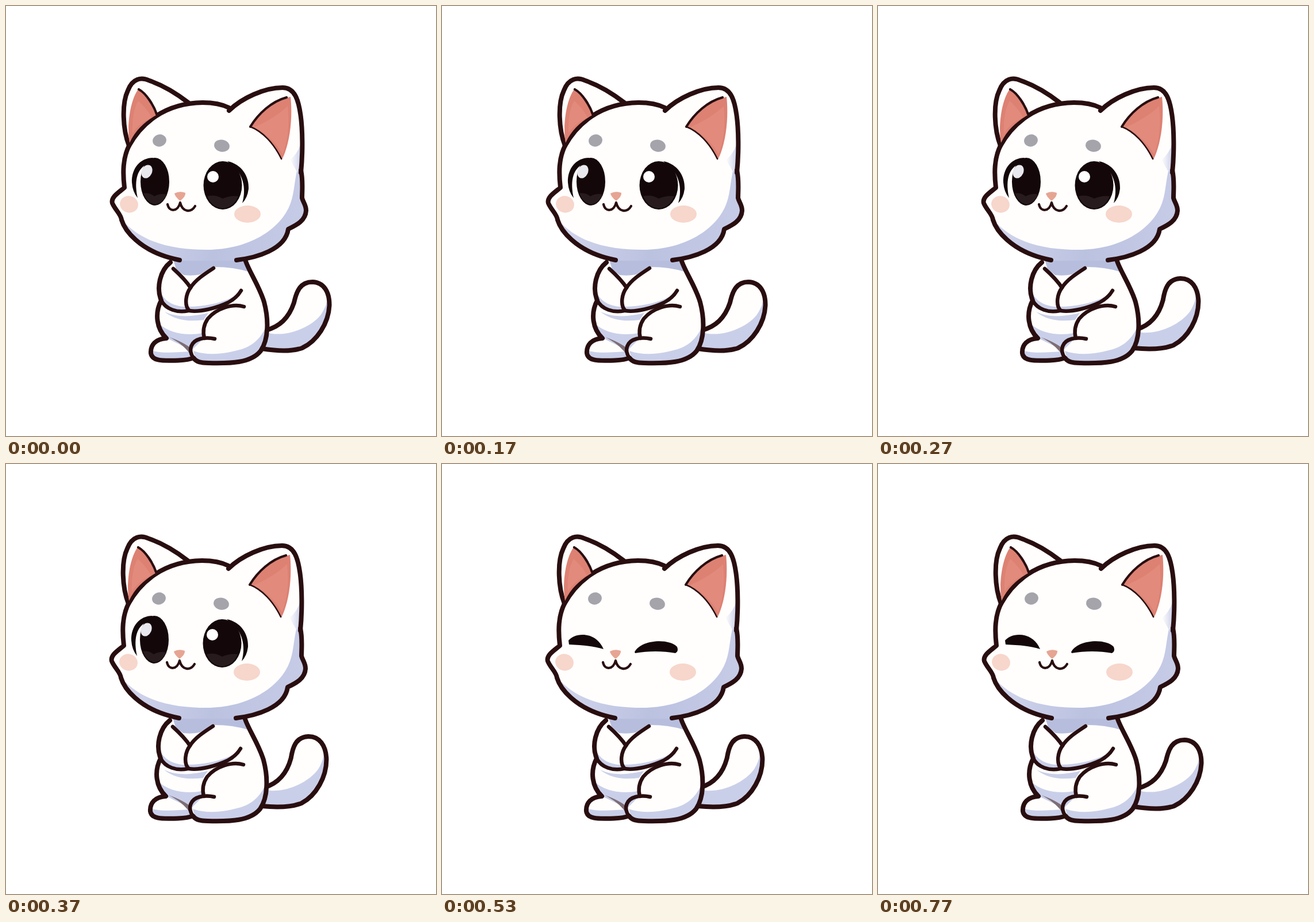
An HTML page that plays this animation: 748x748 px, repeating every 800 ms.

```html
<!DOCTYPE html>
<html lang="en">
<head>
<meta charset="utf-8">
<title>Blinking kitten</title>
<style>
  html, body { margin: 0; width: 100%; height: 100%; overflow: hidden; background: #fff; }
  svg { display: block; width: 100%; height: 100%; }
  .ink { fill: none; stroke: #290e10; stroke-width: 8; stroke-linecap: round; stroke-linejoin: round; }
  .thin { stroke-width: 6.5; }
  .fine { stroke-width: 4.2; }
  .hair { stroke-width: 2.5; }
  .fur { fill: #fffefd; }
  .shade { fill: #cacfe9; }
  .deep { fill: #b7bedd; }
  .pink { fill: #dd8173; }
  .rose { fill: #e28b7c; }
  .blush { fill: #f7d6cb; }
  .brow { fill: #a6a4ab; }
  .black { fill: #130709; }
</style>
</head>
<body>
<svg viewBox="0 0 748 748">
  <defs>
    <linearGradient id="headShade" x1="205" x2="515" y1="0" y2="0" gradientUnits="userSpaceOnUse">
      <stop offset="0" stop-color="#d2d5ec"/>
      <stop offset=".5" stop-color="#bbc2e0"/>
      <stop offset="1" stop-color="#c6cbe6"/>
    </linearGradient>
    <linearGradient id="earShade" x1="494" x2="514" y1="0" y2="0" gradientUnits="userSpaceOnUse">
      <stop offset="0" stop-color="#fffefd"/>
      <stop offset="1" stop-color="#cacfe9"/>
    </linearGradient>
    <path id="tailShape" d="M452 564C477 558 493 540 501 516C505 498 511 480 533 480C553 480.500 563 498 562.500 521C561 552 541 583 515 595C495 602 470 600 445 596"/>
    <path id="bodyShape" d="M286 446C268 460 261 490 270 512C258 535 262 562 279 578C261 579 251 589 252 604C254 619 276 617 300 616.500C312 616 320 615 326 612C332 620 340 620.500 352 621C392 622 426 621 443 600C457 580 457 545 449 515C441 488 424 464 417 444"/>
    <path id="leftEar" d="M214 243C203 215 201 170 212 147C220 126 235 123 250 130C276 139 299 154 317 168"/>
    <path id="rightEar" d="M388 182C410 160 450 142 481 142C503 142 509 165 512.500 190C516 215 516.500 255 513 290"/>
  </defs>

  <g id="cat">
    <g id="tail">
      <use href="#tailShape" class="fur"/>
      <path class="shade" d="M452 568C490 578 532 557 547 538C555 527 559 515 560 504C566 550 541 583 515 594C495 602 470 600 445 596Z"/>
      <use href="#tailShape" class="ink"/>
    </g>

    <use href="#bodyShape" class="fur"/>
    <path class="shade" d="M271 502C280 518 300 524 316 523L317 532L345 530C375 523 400 510 408 497C392 513 350 523 318 523L316 534L276 526Z"/>
    <path class="shade" d="M276 532C300 543 326 540 352 534L344 546C320 549 296 548 276 532Z"/>
    <path class="shade" d="M266 552C283 570 316 574 342 569L342 580L323 599L280 578Z"/>
    <path class="shade" d="M255 600C275 605 300 602 322 601L326 612C305 617 275 618 258 612Z"/>
    <path class="shade" d="M326 600C355 610 385 604 410 597C432 590 445 575 453 556C454 580 448 600 437 609C415 622 375 621 345 620C334 618 328 612 326 600Z"/>
    <path fill="#7d6e76" d="M284 576C303 583 314 589 323 596L321 606C312 594 300 584 284 576Z"/>
    <path class="deep" d="M290 438L296 458L309 468Q324 470 338 467L358 454Q392 453 421 462L412 436Z"/>
    <use href="#bodyShape" class="ink"/>
    <g class="ink thin">
      <path d="M291 457C301 466 312 476 321 490C329 477 344 467 361 456"/>
      <path d="M321 490C312 502 310 522 319 530C338 533 367 525 386 516C399 509 405 502 409 495"/>
      <path d="M270 512C278 528 298 534 317 530"/>
      <path d="M414 523C394 517 366 526 351 544C342 557 343 570 345 578"/>
      <path d="M326 612C316 598 322 583 338 579Q350 576 363 579"/>
    </g>

    <use href="#leftEar" class="fur"/>
    <use href="#leftEar" class="ink"/>
    <use href="#rightEar" class="fur"/>
    <path fill="url(#headShade)" d="M214 243C235 205 275 169 342 168C362 168 380 172 392 178L510 280C517 300 515 322 514 334C516 342 522 346 522 356C521 373 506 381 491 388C476 425 435 440 398 443L307 443C290 441 280 437 270 433C235 420 208 395 201 372C200 362 190 355 186 345C182 335 195 325 205 317C202 290 203 265 214 243Z"/>
    <path class="fur" d="M214 243C235 205 275 169 342 168C362 168 380 172 392 178L512 268C501 295 503 322 495 343C478 390 420 424 350 424C295 424 238 414 202 372C200 362 190 355 186 345C182 335 195 325 205 317C202 290 203 265 214 243Z"/>
    <path fill="url(#earShade)" d="M514 235C510 250 503 261 494 267L506 288L514 285Z"/>
    <use href="#rightEar" class="ink"/>
    <path class="ink" d="M214 243C235 205 275 169 342 168C362 168 378 172 388 177"/>
    <path class="ink" d="M214 243C203 265 203 290 206 316C195 325 182 333 185 343C190 355 200 362 201 372C208 395 235 420 270 433Q283 438 302 442"/>
    <path class="ink" d="M513 286C517 303 515 322 515 334C517 342 522 346 522 356C521 373 506 381 491 388C486 424 435 438 401 442"/>

    <path class="pink" d="M230 145C215 165 210 212 215 238C226 214 244 200 261 190C256 172 244 152 230 145Z"/>
    <path class="rose" d="M230 165C242 176 250 186 253 194C240 200 228 209 220 222C219 200 222 178 230 165Z"/>
    <path class="ink fine" d="M231 145C244 152 257 173 262 188"/>
    <path class="pink" d="M495 158C465 165 439 187 425 210C449 221 469 241 480 267C494 240 499 195 495 158Z"/>
    <path class="rose" d="M490 174C474 190 452 202 432 211C456 224 471 240 481 258C491 233 493 204 490 174Z"/>
    <path class="ink fine" d="M488 159C462 166 439 187 425 210"/>
    <path class="ink hair" d="M425 210C446 218 466 239 479 266"/>

    <ellipse class="brow" cx="267" cy="234" rx="12" ry="10.500" transform="rotate(-15 267 234)"/>
    <ellipse class="brow" cx="375.500" cy="243" rx="13.500" ry="10.500" transform="rotate(10 375 243)"/>
    <ellipse class="blush" cx="214" cy="345" rx="16" ry="14.500" transform="rotate(15 214 345)"/>
    <ellipse class="blush" cx="420" cy="362" rx="23" ry="15"/>
    <path fill="#e6a593" d="M293 326Q302 321 312 325Q313 331 303 339Q294 332 293 326Z"/>
    <path class="ink fine" d="M281 345C284 359 299 358 303 342C307 359 322 360 329 348"/>

    <g id="openEyes">
      <path class="black" d="M256 264C233 264 218 283 219 307Q220 323 229 334C223 306 227 286 243 276Z"/>
      <ellipse class="black" cx="259" cy="305.500" rx="25" ry="41.500"/>
      <path fill="#281b1e" d="M239 326Q249 324 258 331Q269 325 279 328Q272 344 259 345Q246 343 239 326Z"/>
      <ellipse fill="#e9e8ee" cx="245" cy="288" rx="9" ry="12" transform="rotate(25 245 288)"/>
      <path class="black" d="M385 270C410 275 423 296 422 318Q420 334 411 343C419 316 411 290 394 279Z"/>
      <ellipse class="black" cx="377" cy="312" rx="33.500" ry="42"/>
      <path fill="#281b1e" d="M350 331Q363 327 377 335Q391 329 404 331Q395 351 377 352Q358 350 350 331Z"/>
      <circle fill="#fff" cx="360" cy="297" r="10"/>
    </g>
    <g id="closedEyes" class="black">
      <path d="M221 307C232 293 268 290 282 322C263 316 243 315 222 314Z"/>
      <path d="M336 327C348 305 396 303 410 318Q413 326 407 329C385 325 360 325 337 329Z"/>
    </g>
  </g>
</svg>
<script>
  const LOOP = 800;
  const part = id => document.getElementById(id);
  const cat = part('cat'), tail = part('tail');
  const openEyes = part('openEyes'), closedEyes = part('closedEyes');

  function draw(now) {
    const t = now % LOOP;
    const raised = t >= 200 && t < 600;
    const closed = t >= 400;
    cat.setAttribute('transform', raised ? 'translate(-1 0)' : '');
    tail.setAttribute('transform', raised ? 'translate(0 -1.5) rotate(-3.5 455 585)' : '');
    openEyes.style.display = closed ? 'none' : '';
    closedEyes.style.display = closed ? '' : 'none';
    requestAnimationFrame(draw);
  }
  draw(performance.now());
</script>
</body>
</html>
```
